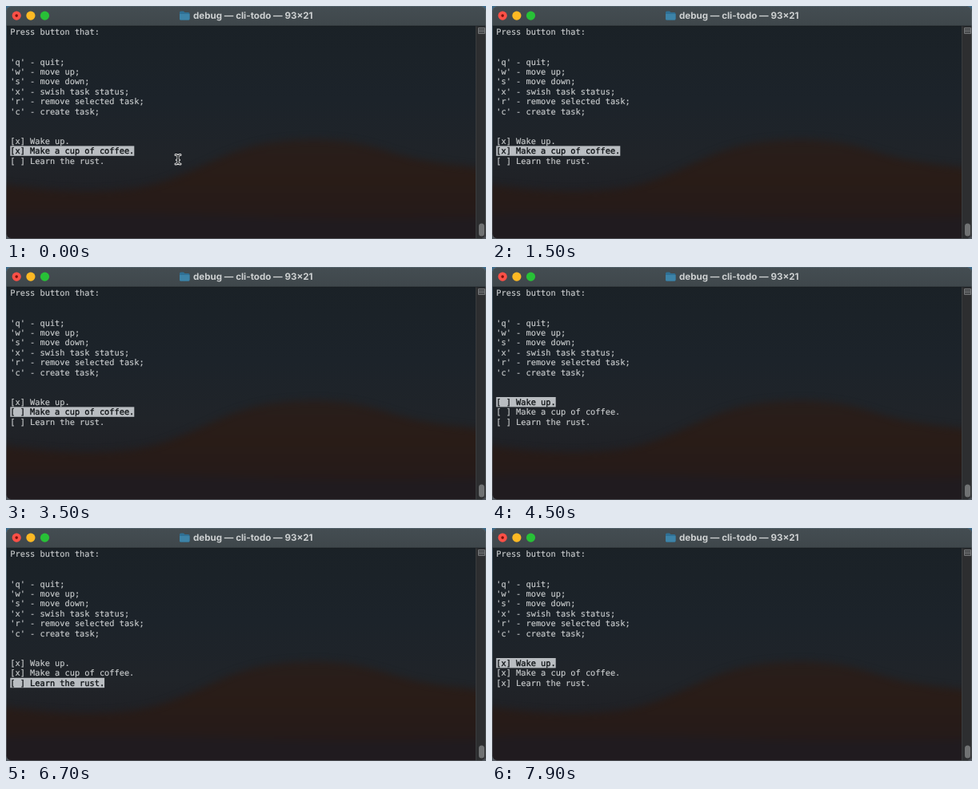
These frames come from a looping animation (600 px wide and 292 px high, 8 s). An HTML page:

```html
<!DOCTYPE html>
<html lang="en">
<head>
<meta charset="utf-8">
<style>
html, body { margin: 0; width: 100%; height: 100%; overflow: hidden; background: linear-gradient(#3d6c8c, #545a61); }
svg { display: block; width: 600px; height: 292px; }
text { white-space: pre; text-rendering: geometricPrecision; }
.term { font: 10.3px "DejaVu Sans Mono", monospace; fill: #c9cccd; stroke: #c9cccd; stroke-width: .15px; }
.term .on { fill: #0c1013; stroke: #0c1013; stroke-width: .3px; }
.title { font: 700 11.6px Inter, sans-serif; fill: #cdd0d1; }
</style>
</head>
<body>
<svg viewBox="0 0 600 292">
  <defs>
    <linearGradient id="sky" x2="0" y2="1">
      <stop offset="0" stop-color="#1a2126"/>
      <stop offset=".4" stop-color="#1c232a"/>
      <stop offset=".65" stop-color="#202429"/>
      <stop offset="1" stop-color="#1f1c20"/>
    </linearGradient>
    <linearGradient id="sand" x2="0" y2="1">
      <stop offset="0" stop-color="#281e1b"/>
      <stop offset=".5" stop-color="#291c17"/>
      <stop offset="1" stop-color="#241a19"/>
    </linearGradient>
    <linearGradient id="bar" x2="0" y2="1">
      <stop offset="0" stop-color="#444d52"/>
      <stop offset="1" stop-color="#3f474b"/>
    </linearGradient>
    <filter id="soft" x="-10%" y="-30%" width="120%" height="160%" color-interpolation-filters="sRGB">
      <feGaussianBlur stdDeviation="5"/>
    </filter>
    <clipPath id="win"><rect x=".5" y=".5" width="599.5" height="291" rx="6"/></clipPath>
  </defs>
  <g clip-path="url(#win)">
    <rect width="600" height="292" fill="url(#sky)"/>
    <g filter="url(#soft)">
      <path fill="url(#sand)" d="M-20 222C50 232 140 240 200 219S280 177 340 170S440 170 480 183S560 199 620 206V268H-20Z"/>
      <path fill="#201b1f" d="M-20 262Q150 258 300 264T620 264V310H-20Z"/>
    </g>
    <path fill="#2d2e30" d="M587 25h13v267h-13z"/>
    <path stroke="#3a3c3e" d="M587.5 25v267"/>
    <rect x="591" y="272.5" width="7" height="16" rx="3.5" fill="#707273"/>
    <path fill="#3c3e40" stroke="#76787a" d="M590.5 27.5h8v7h-8zM591 30h7M591 32h7"/>
    <rect width="600" height="25" fill="url(#bar)"/>
    <path stroke="#15191c" stroke-opacity=".6" d="M0 25h600"/>
  </g>
  <rect x=".5" y=".5" width="599" height="291" rx="6" fill="none" stroke="#7a858b" stroke-opacity=".4"/>
  <circle cx="13.2" cy="12.1" r="5.6" fill="#fe5047"/>
  <circle cx="13.2" cy="12.1" r="1.8" fill="#7c130d"/>
  <circle cx="30.9" cy="12.1" r="5.6" fill="#fdb924"/>
  <circle cx="48.5" cy="12.1" r="5.6" fill="#28c137"/>
  <path fill="#2f7095" d="M217 8q0-1.500 1.500-1.500h3.500l1.500 1.500h4.500q1.500 0 1.500 1.500v6.500q0 1.500-1.500 1.500h-9.500q-1.500 0-1.500-1.500z"/>
  <path fill="#3d83a8" d="M217 10h12.500v6q0 1.500-1.500 1.500h-9.500q-1.500 0-1.500-1.500z"/>
  <text class="title" x="234" y="16.200">debug — cli-todo — 93×21</text>
  <rect id="mark" x="5.300" height="12.400" fill="#b9bdc1"/>
  <g id="lines" class="term"></g>
  <g id="beam" fill="none" stroke-linecap="round">
    <path id="ibeam" stroke="#e8e8e8" stroke-width="3" d="M212 186.500q3 0 3 2v7.500q0 2-3 2M218 186.500q-3 0-3 2v7.500q0 2 3 2M213.500 193h3"/>
    <path stroke="#15181a" d="M212 186.500q3 0 3 2v7.500q0 2-3 2M218 186.500q-3 0-3 2v7.500q0 2 3 2M213.500 193h3"/>
  </g>
</svg>
<script>
const LOOP = 8000, LEFT = 5.3, CELL = 6.2, ROW = 12.4, BASE = 36.3, FIRST = 11;
const $ = id => document.getElementById(id);
const help = ["Press button that:", "", "", "'q' - quit;", "'w' - move up;", "'s' - move down;",
  "'x' - swish task status;", "'r' - remove selected task;", "'c' - create task;"];
const tasks = ["Wake up.", "Make a cup of coffee.", "Learn the rust."];
// key presses: [time in ms, key]
const keys = [[400, "s"], [1300, "w"], [2200, "s"], [2800, "w"], [3300, "x"], [3700, "w"], [4100, "x"],
  [5100, "x"], [5300, "s"], [5900, "x"], [6700, "s"], [7100, "x"], [7500, "w"], [7800, "w"]];

function addLine(str, row) {
  const el = document.createElementNS("http://www.w3.org/2000/svg", "text");
  el.setAttribute("x", LEFT);
  el.setAttribute("y", BASE + row * ROW);
  el.textContent = str;
  return $("lines").appendChild(el);
}
help.forEach(addLine);
const items = tasks.map((task, i) => addLine(task, FIRST + i));

function draw(now) {
  const t = now % LOOP, done = [true, true, false];
  let sel = 1;
  for (const [time, key] of keys) {
    if (time > t) break;
    if (key === "x") done[sel] = !done[sel];
    else sel += key === "s" ? 1 : -1;
  }
  items.forEach((el, i) => {
    el.textContent = `[${done[i] ? "x" : " "}] ${tasks[i]}`;
    el.classList.toggle("on", i === sel);
  });
  $("mark").setAttribute("y", BASE + (FIRST + sel) * ROW - 9.7);
  $("mark").setAttribute("width", (tasks[sel].length + 4) * CELL);
  $("beam").style.display = t < keys[0][0] ? "" : "none";
}

let start;
function tick(now) {
  start ??= now;
  draw(now - start);
  requestAnimationFrame(tick);
}
draw(0);
requestAnimationFrame(tick);
</script>
</body>
</html>
```
